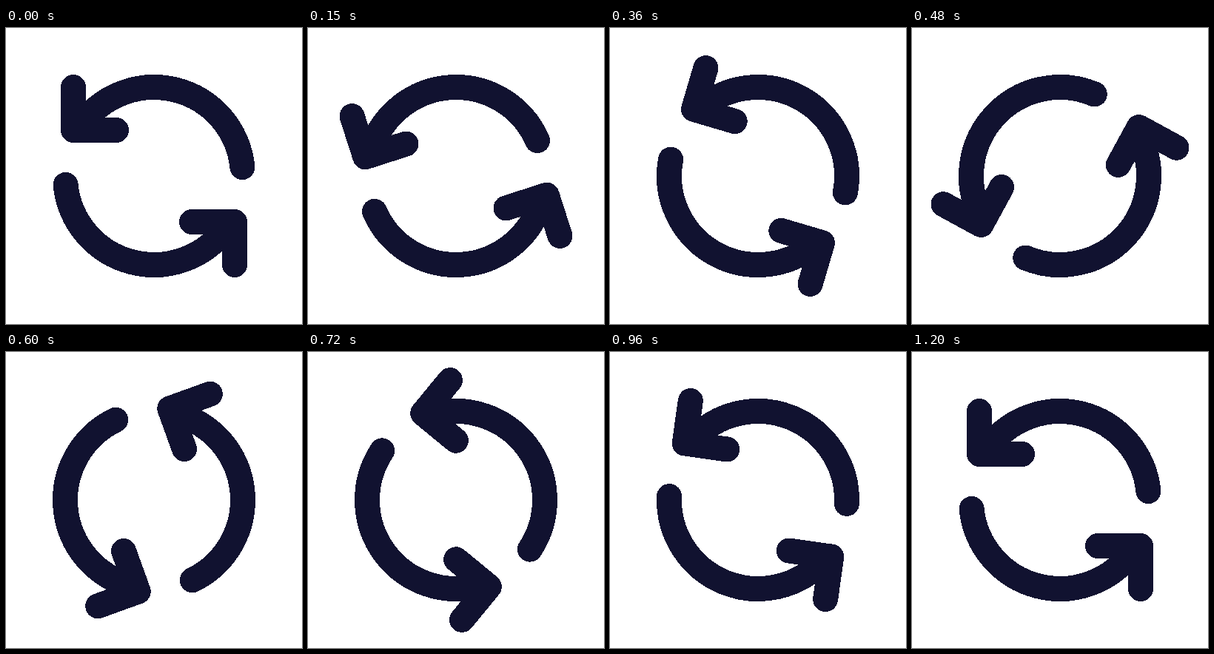
Write an HTML page that moves like this. It is 400 px wide and 400 px high and loops after 3.23 s.

```html
<!DOCTYPE html>
<html lang="en">
<head>
<meta charset="utf-8">
<title>Refresh</title>
<style>
  html, body { margin: 0; width: 100%; height: 100%; overflow: hidden; background: #fff; }
  svg { display: block; width: 100%; height: 100%; }
</style>
</head>
<body>
<svg viewBox="0 0 400 400" shape-rendering="crispEdges">
  <g id="icon" fill="none" stroke="#111230" stroke-width="34" stroke-linecap="round" stroke-linejoin="round">
    <path id="top"/>
    <path id="bottom" transform="rotate(180 200 200)"/>
  </g>
</svg>
<script>
  const LOOP = 3230, STEP = 30;
  const TURN_START = 20, TURN_END = 1200;
  const icon = document.getElementById('icon');

  const onRing = deg => {
    const a = deg * Math.PI / 180;
    return (200 + 120 * Math.cos(a)).toFixed(2) + ' ' + (200 - 120 * Math.sin(a)).toFixed(2);
  };
  const arrow = `M${onRing(5.7)}A120 120 0 0 0 ${onRing(146)}M91 80V138H149`;
  for (const id of ['top', 'bottom']) document.getElementById(id).setAttribute('d', arrow);

  // Cubic Bezier easing with control points (x1, 0) and (x2, 1)
  function ease(x, x1 = 0.333, x2 = 0.15) {
    let lo = 0, hi = 1;
    for (let i = 0; i < 30; i++) {
      const s = (lo + hi) / 2, r = 1 - s;
      if (3 * x1 * s * r * r + 3 * x2 * s * s * r + s * s * s < x) lo = s;
      else hi = s;
    }
    return lo * lo * (3 - 2 * lo);
  }

  function draw(ms) {
    const t = Math.floor((ms % LOOP) / STEP) * STEP;
    const p = (t - TURN_START) / (TURN_END - TURN_START);
    const angle = p > 0 && p < 1 ? -360 * ease(p) : 0;
    icon.setAttribute('transform', `rotate(${angle.toFixed(3)} 200 200)`);
  }

  const start = performance.now();
  function tick() {
    draw(performance.now() - start);
    requestAnimationFrame(tick);
  }
  draw(0);
  requestAnimationFrame(tick);
</script>
</body>
</html>
```
